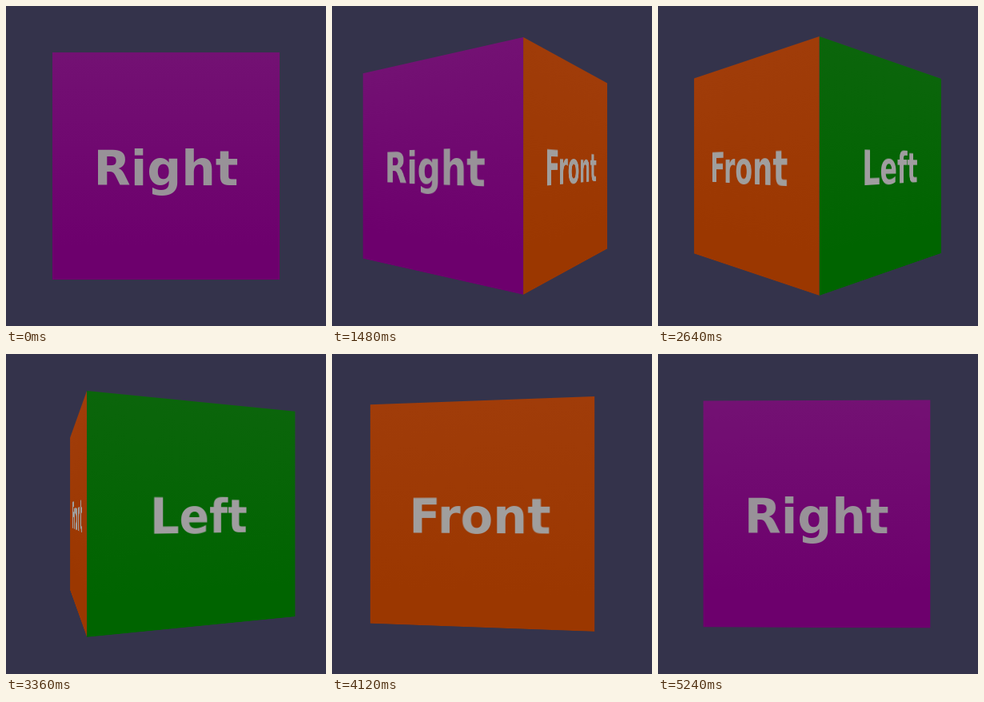
These frames come from a looping animation (400x400 px, 5.28 s). An HTML page:

```html
<!DOCTYPE html>
<html lang="en">
<head>
<meta charset="utf-8">
<title>Turning cube</title>
<style>
  html, body { margin: 0; width: 100%; height: 100%; overflow: hidden; background: #34334b; }
  #stage {
    position: absolute; left: 0; top: 0; width: 400px; height: 400px;
    overflow: hidden; perspective: 474px;
  }
  #cube {
    position: absolute; left: 58px; top: 58px; width: 284px; height: 284px;
    transform-style: preserve-3d; transform: translateZ(-142px);
  }
  .face {
    position: absolute; inset: 0; backface-visibility: hidden;
    transform: rotateY(var(--turn)) translateZ(142px);
    background: linear-gradient(var(--top), var(--low) 85%);
    color: var(--ink);
    font: bold 60px/284px "DejaVu Sans", Verdana, sans-serif;
    text-align: center; white-space: nowrap;
  }
  .face span { position: relative; top: 2.5px; }
  .right { --turn: 0deg; --top: #731173; --low: #6d006d; --ink: #989298; }
  .front { --turn: 90deg; --top: #a03c09; --low: #9b3700; --ink: #a09e9d; }
  .left { --turn: 180deg; --top: #0b650b; --low: #006400; --ink: #a09da0; }
</style>
</head>
<body>
<div id="stage">
  <div id="cube">
    <div class="face right"><span>Right</span></div>
    <div class="face front"><span>Front</span></div>
    <div class="face left"><span>Left</span></div>
  </div>
</div>
<script>
  const LOOP = 5280, TICK = 40, HOLD = 1080, MIDDLE = 3160;
  const FIRST = 0.8, STEP = 3.43; // degrees
  const cube = document.getElementById('cube');
  const start = performance.now();

  // Rest, then turn at a steady rate to the far side and back.
  function angleAt(ms) {
    const t = Math.floor(ms / TICK) * TICK;
    if (t < HOLD) return 0;
    const steps = (MIDDLE - HOLD - Math.abs(t - MIDDLE)) / TICK;
    return FIRST + STEP * steps;
  }

  function draw() {
    const ms = Math.max(0, performance.now() - start) % LOOP;
    cube.style.transform = `translateZ(-142px) rotateY(${-angleAt(ms)}deg)`;
    requestAnimationFrame(draw);
  }
  draw();
</script>
</body>
</html>
```
